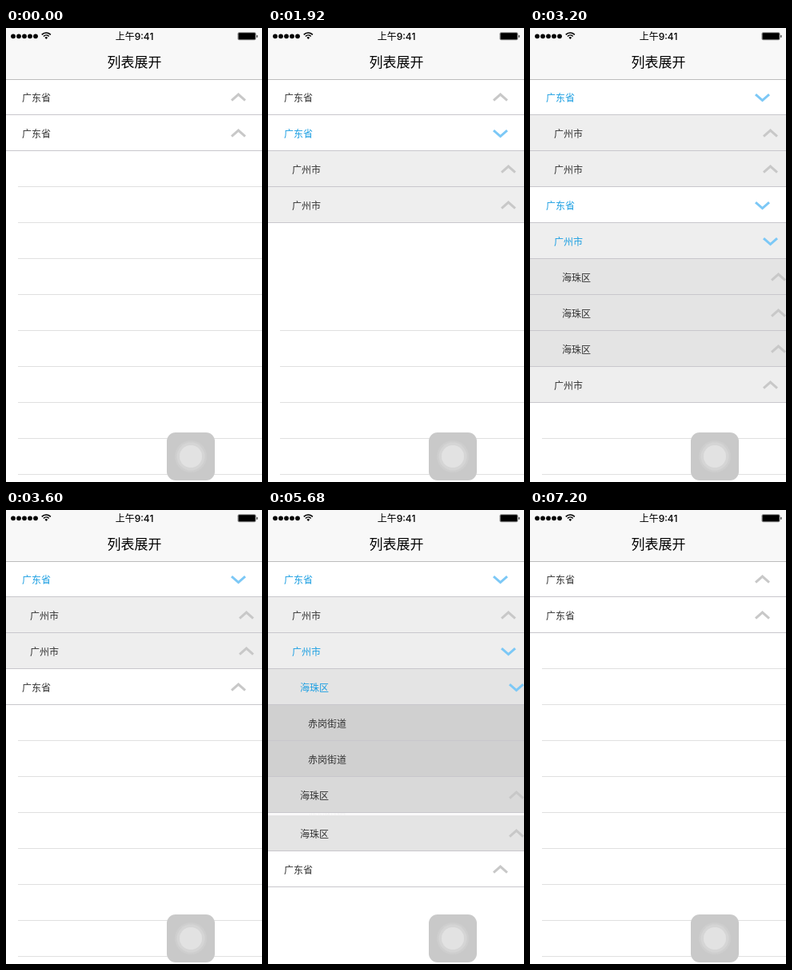
An HTML page with a canvas for the animation above (8400 ms loop, 320 by 568 pixels).

```html
<!DOCTYPE html>
<html lang="zh-CN">
<head>
<meta charset="utf-8">
<title>列表展开</title>
<style>
html, body { margin: 0; width: 100%; height: 100%; overflow: hidden; background: #fff; }
canvas { display: block; width: 320px; height: 568px; }
</style>
</head>
<body>
<canvas id="stage"></canvas>
<script>
const W = 320, H = 568, LOOP = 8400, STEP = 80;
const NAV = 64, ROW = 45, FOLD_MS = 300;
const FONT = '"Noto Sans CJK SC", "Noto Sans CJK", "Noto Sans", sans-serif';
const LEVEL_FILL = ['#fff', '#eee', '#e4e4e4', '#d0d0d0'];
const SEPARATOR = '#c8c7cc', EMPTY_LINE = '#e0e0e0';

const canvas = document.getElementById('stage');
const ctx = canvas.getContext('2d');
const scale = window.devicePixelRatio || 1;
canvas.width = W * scale;
canvas.height = H * scale;

const node = (text, children = [], id = '') => ({ text, children, id });
const street = () => node('赤岗街道');
const district = id => node('海珠区', [street(), street()], id);
const city = (id, prefix) => node('广州市', [1, 2, 3].map(n => district(prefix + n)), id);
const tree = [
  node('广东省', [city('cityA', 'a'), city('cityB', 'b')], 'first'),
  node('广东省', [city('cityC', 'c'), city('cityD', 'd')], 'second')
];

// Taps: row, start time in ms, resulting state (1 open, 0 closed).
const taps = [
  ['second', 1180, 1], ['first', 1910, 1], ['cityC', 2720, 1], ['second', 3215, 0],
  ['cityB', 4065, 1], ['b1', 4630, 1], ['b2', 5645, 1], ['first', 6900, 0]
].map(([id, start, to]) => ({ id, start, to }));

const clamp = v => Math.max(0, Math.min(1, v));
const ease = u => 0.5 - 0.5 * Math.cos(Math.PI * clamp(u));
const lastTap = (id, t) => taps.filter(tap => tap.id === id && tap.start <= t).pop();
const settled = (id, t) => lastTap(id, t)?.to ?? 0;

function openness(id, t) {
  const tap = lastTap(id, t);
  if (!tap) return 0;
  const p = ease((t - tap.start) / FOLD_MS);
  return tap.to ? p : 1 - p;
}

// Flattens the tree into rows, each with the fraction it is unfolded.
function listRows(nodes, openAt, unfolded = 1, level = 0) {
  return nodes.flatMap(item => {
    const inner = unfolded * openAt(item.id);
    return [{ item, level, unfolded },
      ...(inner > 0.001 ? listRows(item.children, openAt, inner, level + 1) : [])];
  });
}

function fillRect(color, x, y, w, h) {
  ctx.fillStyle = color;
  ctx.fillRect(x, y, w, h);
}

function circle(color, x, y, r) {
  ctx.fillStyle = color;
  ctx.beginPath();
  ctx.arc(x, y, r, 0, 2 * Math.PI);
  ctx.fill();
}

function roundRect(color, x, y, w, h, r) {
  ctx.fillStyle = color;
  ctx.beginPath();
  ctx.roundRect(x, y, w, h, r);
  ctx.fill();
}

function label(text, x, baseline, size, color, weight = 400, align = 'left', family = FONT) {
  ctx.font = `${weight} ${size}px ${family}`;
  ctx.textAlign = align;
  ctx.fillStyle = color;
  ctx.fillText(text, x, baseline);
}

function chevron(x, y, down) {
  const d = down ? -3.75 : 3.75;
  ctx.strokeStyle = down ? '#7cc8f6' : '#c8c8c8';
  ctx.lineWidth = 3;
  ctx.beginPath();
  ctx.moveTo(x - 8.5, y + d);
  ctx.lineTo(x, y - d);
  ctx.lineTo(x + 8.5, y + d);
  ctx.stroke();
}

function foldShadow(y, h, strength) {
  const g = ctx.createLinearGradient(0, y, 0, y + h);
  [[0, 0.48], [0.45, 0], [0.6, 0], [1, 0.4]].forEach(([at, a]) =>
    g.addColorStop(at, `rgba(0,0,0,${a * strength})`));
  fillRect(g, 0, y, W, h);
}

function drawRow({ item, level, unfolded }, y, t) {
  const h = ROW * unfolded, middle = y + h / 2;
  const selected = settled(item.id, t - 60);
  const tap = lastTap(item.id, t);
  ctx.save();
  ctx.beginPath();
  ctx.rect(0, y, W, h);
  ctx.clip();
  fillRect('#fff', 0, y, W, h);
  ctx.globalAlpha = unfolded;
  fillRect(LEVEL_FILL[level], 0, y, W, h);
  if (tap && level) {
    ctx.globalAlpha = unfolded * clamp(1.3 - (t - tap.start) / 140);
    fillRect('#d9d9d9', 0, y, W, h);
    ctx.globalAlpha = unfolded;
  }
  label(item.text, 20 + 10 * level, middle + 5, 12, selected ? '#1c9fe2' : '#333');
  if (item.children.length) chevron(290.5 + 10 * level, middle + 0.3, selected);
  fillRect(SEPARATOR, 0, y + h - 1, W, 1);
  ctx.globalAlpha = 1;
  if (unfolded < 0.999) foldShadow(y, h, Math.sin(Math.PI * unfolded));
  ctx.restore();
}

function drawList(t) {
  const finalRows = listRows(tree, id => settled(id, t)).length;
  for (let y = NAV + ROW * (finalRows + 1) - 1; y < H; y += ROW) {
    fillRect(EMPTY_LINE, 15, y, W - 15, 1);
  }
  let y = NAV;
  for (const row of listRows(tree, id => openness(id, t))) {
    drawRow(row, row.unfolded === 1 ? Math.round(y) : y, t);
    y += ROW * row.unfolded;
  }
}

function drawWifi(x, y) {
  ctx.strokeStyle = '#000';
  ctx.lineWidth = 1.6;
  for (const r of [4.6, 7.6]) {
    ctx.beginPath();
    ctx.arc(x, y, r, -Math.PI * 0.76, -Math.PI * 0.24);
    ctx.stroke();
  }
  ctx.fillStyle = '#000';
  ctx.beginPath();
  ctx.moveTo(x, y + 0.5);
  ctx.arc(x, y, 2.4, -Math.PI * 0.78, -Math.PI * 0.22);
  ctx.fill();
}

function drawHeader() {
  fillRect('#f8f8f8', 0, 0, W, NAV);
  fillRect('#bcbcbc', 0, NAV, W, 1);
  for (let i = 0; i < 5; i++) circle('#000', 9 + 7 * i, 10.3, 2.9);
  drawWifi(50.3, 13.6);
  label('上午9:41', 160.5, 14.6, 12, '#000', 500, 'center', `Inter, ${FONT}`);
  roundRect('#8a8a8a', 289.5, 5.3, 23, 10, 2);
  roundRect('#000', 290.7, 6.3, 20.8, 8, 1);
  roundRect('#555', 313, 8.8, 1.6, 3.2, 0.8);
  label('列表展开', 160.5, 48.5, 17, '#000', 500, 'center');
}

function drawTouchButton() {
  roundRect('#c9c9c9', 201, 506, 60, 60, 11);
  circle('#cecece', 231, 536, 20);
  circle('#d5d5d5', 231, 536, 17.5);
  circle('#e2e2e2', 231, 536, 14);
}

function draw(now) {
  const t = Math.floor((now % LOOP) / STEP) * STEP;
  ctx.setTransform(scale, 0, 0, scale, 0, 0);
  fillRect('#fff', 0, 0, W, H);
  drawList(t);
  drawHeader();
  drawTouchButton();
}

let origin;
function tick(now) {
  origin ??= now;
  draw(now - origin);
  requestAnimationFrame(tick);
}
draw(0);
requestAnimationFrame(tick);
</script>
</body>
</html>
```
